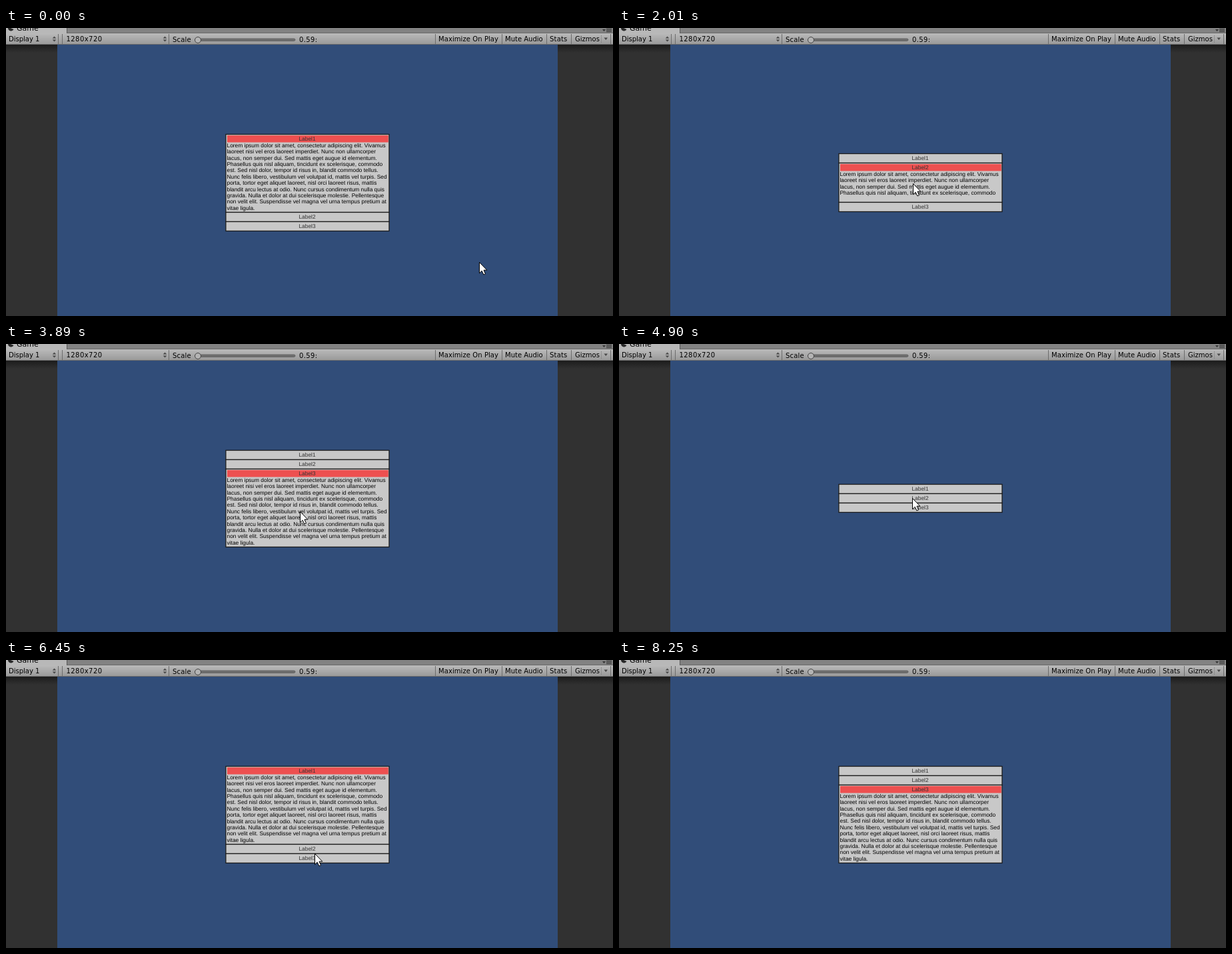
Recreate the animation shown at these times as an HTML page. Size 911 by 432 pixels, loop 8.94 s.

```html
<!DOCTYPE html>
<html lang="en">
<head>
<meta charset="utf-8">
<title>Accordion</title>
<style>
  html, body { margin: 0; width: 100%; height: 100%; overflow: hidden; background: #313131; }
  svg { display: block; }
  text { white-space: pre; }
  .bar text { font: 10px "DejaVu Sans", Verdana, sans-serif; fill: #000; }
  #panels text { font: 8.38px "Liberation Sans", Arial, sans-serif; text-rendering: geometricPrecision; }
  #panels .label { text-anchor: middle; fill: #323232; }
</style>
</head>
<body>
<svg width="911" height="432" viewBox="0 0 911 432">
  <defs>
    <linearGradient id="steel" x2="0" y2="1">
      <stop stop-color="#bababa"/><stop offset="1" stop-color="#9a9a9a"/>
    </linearGradient>
    <linearGradient id="shade" x2="0" y2="1">
      <stop stop-color="#1c1c1c"/><stop offset="1" stop-color="#313131"/>
    </linearGradient>
    <path id="updown" d="M-2.8-1L0-4 2.8-1ZM-2.8 1L0 4 2.8 1Z" fill="#484848"/>
  </defs>

  <rect width="911" height="432" fill="#313131"/>
  <rect y="25" width="911" height="12" fill="url(#shade)"/>
  <rect x="77" y="25" width="751" height="407" fill="#314d79"/>

  <g class="bar">
    <rect width="911" height="8" fill="#828282"/>
    <rect y="7" width="911" height="1" fill="#686868"/>
    <rect y="8" width="911" height="16" fill="url(#steel)"/>
    <rect y="24" width="911" height="1" fill="#6b6b6b"/>
    <rect width="91" height="8" fill="#b8b8b8"/>
    <rect x="91" width="1" height="8" fill="#585858"/>
    <path d="M3 0A4.5 4.5 0 0 0 11.5 2L7 0Z" fill="#282828"/>
    <text x="16" y="4" style="font-size:11px">Game</text>
    <path d="M895 2h5l-2.5 3ZM901 1h8v1h-8ZM901 3h8v1h-8ZM901 5h8v1h-8Z" fill="#333"/>
    <path d="M78.5 9V24M84.5 9V24M244.5 9V24M644.5 9V24M744.5 9V24M811.5 9V24M848.5 9V24M907.5 9V24" stroke="#6c6c6c"/>
    <path d="M893.5 11V22" stroke="#777" stroke-dasharray="1 1"/>
    <use href="#updown" x="72.5" y="16.5"/>
    <use href="#updown" x="238.5" y="16.5"/>
    <path d="M897.5 14.5h5.5l-2.75 3.5Z" fill="#484848"/>
    <rect x="283.5" y="16" width="150.5" height="3.4" rx="1.7" fill="#707070" stroke="#585858" stroke-width=".8"/>
    <circle cx="288" cy="18" r="4.5" fill="#b4b4b4" stroke="#444"/>
    <text x="4" y="20">Display 1</text>
    <text x="90.5" y="20" letter-spacing=".45">1280x720</text>
    <text x="250" y="21" letter-spacing=".2">Scale</text>
    <text x="440" y="21" letter-spacing=".35">0.59:</text>
    <text x="649" y="20" letter-spacing=".08">Maximize On Play</text>
    <text x="749" y="20">Mute Audio</text>
    <text x="816" y="20" letter-spacing=".2">Stats</text>
    <text x="854" y="20">Gizmos</text>
  </g>

  <g id="panels"></g>
  <path id="cursor" d="M.5.5V16.8L4.2 13.3 6.9 19 9.5 17.9 7 12.2H11.8Z" fill="#fff" stroke="#000"/>
</svg>

<script>
const LOOP = 8940, ROW = 14.1, LINE = 9.36, MIDDLE = 231.8;
const lorem = `Lorem ipsum dolor sit amet, consectetur adipiscing elit. Vivamus
laoreet nisi vel eros laoreet imperdiet. Nunc non ullamcorper
lacus, non semper dui. Sed mattis eget augue id elementum.
Phasellus quis nisl aliquam, tincidunt ex scelerisque, commodo
est. Sed nisl dolor, tempor id risus in, blandit commodo tellus.
Nunc felis libero, vestibulum vel volutpat id, mattis vel turpis. Sed
porta, tortor eget aliquet laoreet, nisl orci laoreet risus, mattis
blandit arcu lectus at odio. Nunc cursus condimentum nulla quis
gravida. Nulla et dolor at dui scelerisque molestie. Pellentesque
non velit elit. Suspendisse vel magna vel urna tempus pretium at
vitae ligula.`;
const shortLorem = lorem.slice(0, lorem.indexOf(" Nunc cursus"));

// Each click leaves at most one panel open
const NONE = -1;
const clicks = [
  { at: 630, open: NONE }, { at: 1830, open: 1 }, { at: 2810, open: NONE }, { at: 3550, open: 2 },
  { at: 4390, open: NONE }, { at: 5250, open: 0 }, { at: 6820, open: 2 }
];
// Cursor moves: from, to, x, y; it rests in between
const moves = [
  [0, 280, 434, 164], [660, 1370, 429, 221], [1500, 1690, 441, 233], [2520, 2710, 425, 215],
  [2880, 3110, 437, 236], [3110, 3890, 441, 251], [4640, 5070, 439, 218], [5550, 6300, 463, 290],
  [6580, 6680, 463, 295], [7800, 8250, 920, 440]
];

const progress = (t, from, to) => Math.max(0, Math.min(1, (t - from) / (to - from)));
const mix = (a, b, p) => a + (b - a) * p;

function add(parent, tag, attrs, content = "") {
  const el = document.createElementNS("http://www.w3.org/2000/svg", tag);
  for (const key in attrs) el.setAttribute(key, attrs[key]);
  el.textContent = content;
  return parent.appendChild(el);
}

const root = document.getElementById("panels");
const cursor = document.getElementById("cursor");
const panels = [lorem, shortLorem, lorem].map((body, i) => {
  const group = add(root, "g", {});
  const box = add(group, "rect", { x: 329.9, width: 245.1, fill: "#c8c8c8", stroke: "#1c1c1c", "stroke-width": 1.3 });
  const mark = add(group, "rect", { x: 332, y: 1.6, width: 241.8, height: 10.4, fill: "#ed5050" });
  add(group, "text", { class: "label", x: 452, y: 9.7 }, "Label" + (i + 1));
  const lines = body.split("\n").map((line, n) =>
    add(group, "text", { x: 331.5, y: 19.5 + n * LINE }, line));
  return { group, box, mark, lines };
});

function openness(panel, t, duration) {
  return clicks.reduce((value, { at, open }) =>
    mix(value, +(open === panel), progress(t, at, at + duration)), +(panel === 0));
}

function cursorAt(t) {
  return moves.reduce(([x, y], [from, to, toX, toY]) => {
    const p = progress(t, from, to);
    return [mix(x, toX, p), mix(y, toY, p)];
  }, [711, 352]);
}

function draw(t) {
  const heights = panels.map((p, i) => ROW + openness(i, t, 300) * p.lines.length * LINE);
  let top = MIDDLE - heights.reduce((a, b) => a + b) / 2;
  panels.forEach((p, i) => {
    const bottom = top + heights[i];
    p.group.setAttribute("transform", `translate(0 ${Math.floor(top) + .5})`);
    p.box.setAttribute("height", Math.floor(bottom) - Math.floor(top));
    p.mark.setAttribute("opacity", openness(i, t, 100));
    const visible = Math.floor((heights[i] - ROW) / LINE + .01);
    p.lines.forEach((line, n) => line.setAttribute("visibility", n < visible ? "visible" : "hidden"));
    top = bottom;
  });
  cursor.setAttribute("transform", `translate(${cursorAt(t).map(Math.round)})`);
}

const start = performance.now();
function frame() {
  draw((performance.now() - start) % LOOP);
  requestAnimationFrame(frame);
}
frame();
</script>
</body>
</html>
```
